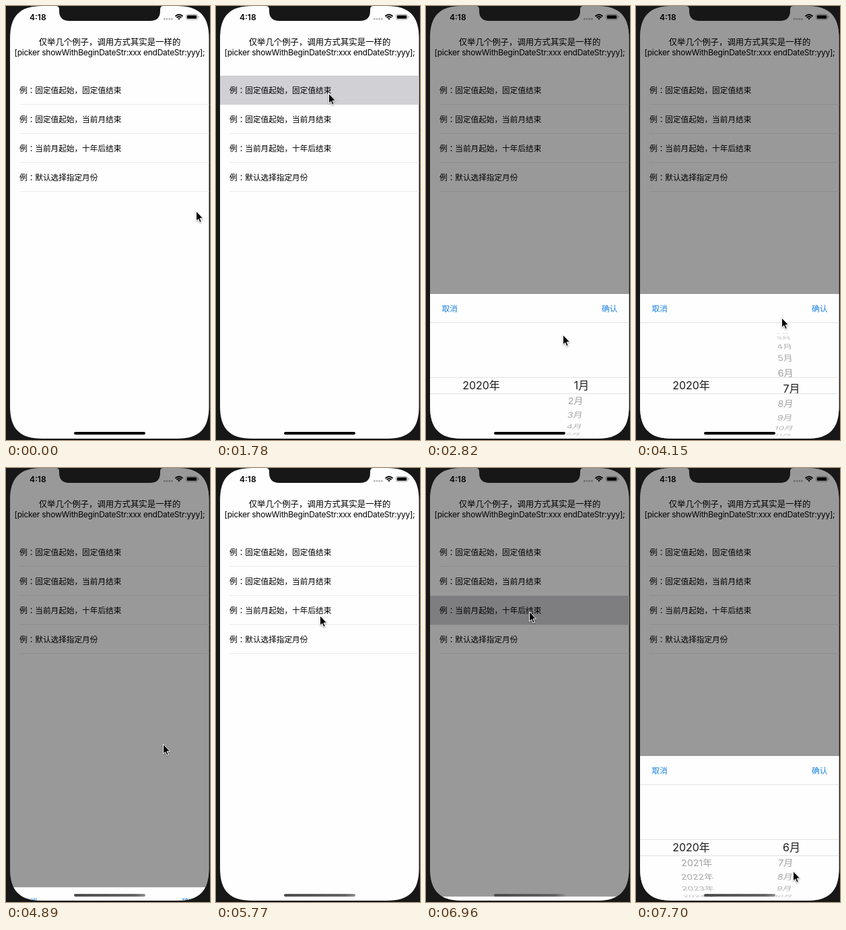
An HTML page for the animation above (7990 ms loop, 303x642 px).

```html
<!DOCTYPE html>
<html lang="ja">
<head>
<meta charset="utf-8">
<title>Month picker demo</title>
<style>
  html, body { margin: 0; width: 100%; height: 100%; overflow: hidden; background: #171717; }
  svg { display: block; width: 303px; height: 642px; }
  text { font-family: "Noto Sans CJK JP", "Noto Sans CJK SC", "Noto Sans CJK", sans-serif; font-size: 11.65px; font-weight: 300; fill: #000; white-space: pre; }
  .latin { font-family: Inter, Roboto, sans-serif; font-weight: 400; }
  .head { font-size: 12.4px; text-anchor: middle; }
  .call { font-size: 12px; letter-spacing: -.25px; }
  .heavy { font-weight: 400; }
  .button { fill: #1a82e2; font-weight: 400; }
  .wheel text { font-family: Inter, "Noto Sans CJK JP", "Noto Sans CJK SC", "Noto Sans CJK", sans-serif; font-size: 16px; font-weight: 400; text-anchor: middle; }
  .outer text { fill: #999; }
  .inner text { fill: #1c1c1c; }
  .rule { stroke: #ececee; stroke-width: 1; }
  .edge { stroke: #e2e2e4; stroke-width: 1; }
  #cursor { filter: drop-shadow(0 1px 1px rgba(0, 0, 0, .35)); }
</style>
</head>
<body>
<svg viewBox="0 0 303 642">
  <defs>
    <clipPath id="screen">
      <path d="M6 48C6 14.4 20.4 0 54 0H253.5C287.1 0 301.5 14.4 301.5 48V592C301.5 625.6 287.1 640 253.5 640H54C20.4 640 6 625.6 6 592Z"/>
    </clipPath>
    <clipPath id="band"><rect x="0" y="123" width="303" height="24"/></clipPath>
    <clipPath id="around"><path d="M0 43H303V123H0ZM0 147H303V216H0Z"/></clipPath>
    <linearGradient id="fade">
      <stop offset="0" stop-color="#4c4c4c"/>
      <stop offset=".85" stop-color="#636363"/>
      <stop offset="1" stop-color="#909090"/>
    </linearGradient>
  </defs>
  <rect width="303" height="642" fill="#171717"/>
  <g clip-path="url(#screen)">
    <rect width="303" height="642" fill="#fefefe"/>
    <rect id="mark" x="0" width="303" height="43" fill="#d1d0d5"/>
    <g id="rules"></g>
    <text class="head" x="154" y="58">仅举几个例子，调用方式其实是一样的</text>
    <text class="head latin call" x="154" y="72.5">[picker showWithBeginDateStr:xxx endDateStr:yyy];</text>
    <text x="20" y="129.4">例：固定<tspan class="heavy">值</tspan>起始，固定<tspan class="heavy">值结</tspan>束</text>
    <text x="20" y="172.4">例：固定<tspan class="heavy">值</tspan>起始，当前月<tspan class="heavy">结</tspan>束</text>
    <text x="20" y="215.2">例：当前月起始，十年后<tspan class="heavy">结</tspan>束</text>
    <text x="20" y="258">例：<tspan class="heavy">默认选择</tspan>指定月份</text>
    <rect id="dim" width="303" height="642" fill="#000" opacity=".4"/>
    <g id="sheet">
      <rect width="303" height="230" fill="#fefefe"/>
      <text class="button" x="23.5" y="26">取消</text>
      <text class="button" x="261" y="26">确认</text>
      <path class="edge" d="M6 42.5H302M6 123.5H302M6 147.5H302"/>
      <g class="wheel outer" id="outer" clip-path="url(#around)"></g>
      <g class="wheel inner" id="inner" clip-path="url(#band)"></g>
    </g>
    <rect id="home" x="101" y="630" width="106" height="4" rx="2"/>
  </g>
  <path d="M74 0Q79 0 79 5V7Q79 22 94 22H214Q229 22 229 7V5Q229 0 234 0Z" fill="#171717"/>
  <text class="latin" x="35" y="21" style="font-size:12px;font-weight:600">4:18</text>
  <path d="M234 19.3h14" stroke="#000" stroke-opacity=".28" stroke-width="2.4" stroke-dasharray="2.6 1.1"/>
  <g fill="none" stroke="#000" stroke-width="1.8">
    <path d="M251.5 15.2Q257 10.4 262.5 15.2M253.5 17.3Q257 14.3 260.5 17.3"/>
    <path d="M255.2 18.5Q257 17.2 258.8 18.5L257 20.4Z" fill="#000" stroke="none"/>
    <rect x="267.5" y="12.5" width="17" height="7.6" rx="2.2" stroke-width=".8" stroke-opacity=".4"/>
    <rect x="268.8" y="13.8" width="14.4" height="5" rx="1.2" fill="#000" stroke="none"/>
    <path d="M286 15v2.6" stroke-width="1" stroke-opacity=".4"/>
  </g>
  <path id="cursor" d="M.5 .5V15L3.7 12 5.9 17.2 8.3 16.2 6.1 11.1H10.6Z" fill="#000" stroke="#fff" stroke-linejoin="round"/>
</svg>
<script>
const LOOP = 7990, STEP = 148.08, SLIDE = 300;
const UP = 426, DOWN = 641, CENTER = 135;
const RADIUS = 77, PITCH = 17.4 * Math.PI / 180;
const $ = id => document.getElementById(id);

// Keys are [tick, ...values]
const path = [
  [0, 282, 303], [1, 272, 283], [4, 212, 180], [6, 156, 121], [7, 157, 119], [8, 167, 129],
  [15, 167, 129], [16, 171, 175], [17, 183, 290], [18, 196, 415], [19, 203, 486],
  [20, 214, 560], [21, 217, 598], [22, 210, 580], [25, 132, 452], [26, 150, 470], [29, 249, 456],
  [30, 266, 445], [32, 266, 445], [33, 233, 408], [34, 190, 288], [35, 190, 288],
  [36, 180, 262], [39, 154, 218], [42, 153, 212], [47, 153, 212],
  [48, 158, 232], [49, 177, 322], [50, 204, 450], [51, 225, 550], [52, 233, 596]
];
const spin = [[22, 0], [25, 3.5], [27, 5.6], [29, 6]];

function sample(keys, n) {
  if (n <= keys[0][0]) return keys[0].slice(1);
  for (let i = 1; i < keys.length; i++) {
    const [a, ...from] = keys[i - 1], [b, ...to] = keys[i];
    if (n <= b) return from.map((v, j) => v + (to[j] - v) * (n - a) / (b - a));
  }
  return keys[keys.length - 1].slice(1);
}

const clamp = v => Math.max(0, Math.min(1, v));
const ease = p => (1 - Math.cos(Math.PI * clamp(p))) / 2;

function add(parent, tag, attrs, label = "") {
  const el = document.createElementNS("http://www.w3.org/2000/svg", tag);
  for (const key in attrs) el.setAttribute(key, attrs[key]);
  el.textContent = label;
  parent.append(el);
  return el;
}

const rules = [0, 1, 2, 3].map(i =>
  add($("rules"), "path", { class: "rule", d: `M20 ${145.5 + 43 * i}H302` }));

function makeColumn(x, first, count, unit) {
  return Array.from({ length: count }, (_, i) => ({
    x, i,
    views: ["outer", "inner"].map(id => add($(id), "text", { y: 5.9 }, first + i + unit))
  }));
}

const pickers = [
  { years: makeColumn(82, 2020, 1, "年"), months: makeColumn(231, 1, 12, "月") },
  { years: makeColumn(82, 2020, 11, "年"), months: makeColumn(231, 6, 7, "月") }
];

function turn(column, pos, shown) {
  for (const { x, i, views: [far, near] } of column) {
    const angle = (i - pos) * PITCH, squash = Math.cos(angle), sin = Math.sin(angle);
    const visible = shown && Math.abs(angle) < 1.48;
    far.style.display = near.style.display = visible ? "" : "none";
    if (!visible) continue;
    const s = .888 - .07 * (1 - squash);
    const lean = (x < 154 ? .2 : -.2) * sin;
    far.setAttribute("transform",
      `matrix(${s} 0 ${lean} ${s * squash} ${154 + (x - 154) * s} ${CENTER + RADIUS * sin})`);
    far.setAttribute("opacity", .45 + .5 * squash);
    near.setAttribute("transform", `matrix(1 0 0 ${squash} ${x} ${CENTER + 1.17 * RADIUS * sin})`);
  }
}

function draw(now) {
  const n = Math.floor((now % LOOP + 6) / STEP), t = n * STEP;
  const late = n >= 40;

  const [x, y] = sample(path, n);
  $("cursor").setAttribute("transform", `translate(${x} ${y})`);

  const open = (n >= 14 && n < 34) || n >= 47;
  const rise = ease((t - (late ? 6925 : 2038)) / SLIDE);
  const fall = late ? 0 : ease((t - 4647) / SLIDE);
  $("sheet").setAttribute("transform", `translate(0 ${DOWN - (DOWN - UP) * (rise - fall)})`);
  $("sheet").style.display = $("dim").style.display = open ? "" : "none";

  const row = late ? 2 : 0;
  const pressed = n >= (late ? 45 : 11);
  const glow = pressed ? 1 - clamp((n - (late ? 47 : 14)) / 2) : 0;
  $("mark").setAttribute("y", 103 + 43 * row);
  $("mark").setAttribute("opacity", glow);
  rules.forEach((rule, i) =>
    rule.setAttribute("opacity", i === row || i === row - 1 ? 1 - glow : 1));

  pickers.forEach(({ years, months }, i) => {
    const shown = open && late === !!i;
    turn(years, 0, shown);
    turn(months, i ? 0 : sample(spin, n)[0], shown);
  });

  $("home").setAttribute("fill", n >= 32 ? "url(#fade)" : "#000");
}

let start;
function tick(now) {
  start ??= now;
  draw(now - start);
  requestAnimationFrame(tick);
}
draw(0);
requestAnimationFrame(tick);
</script>
</body>
</html>
```
